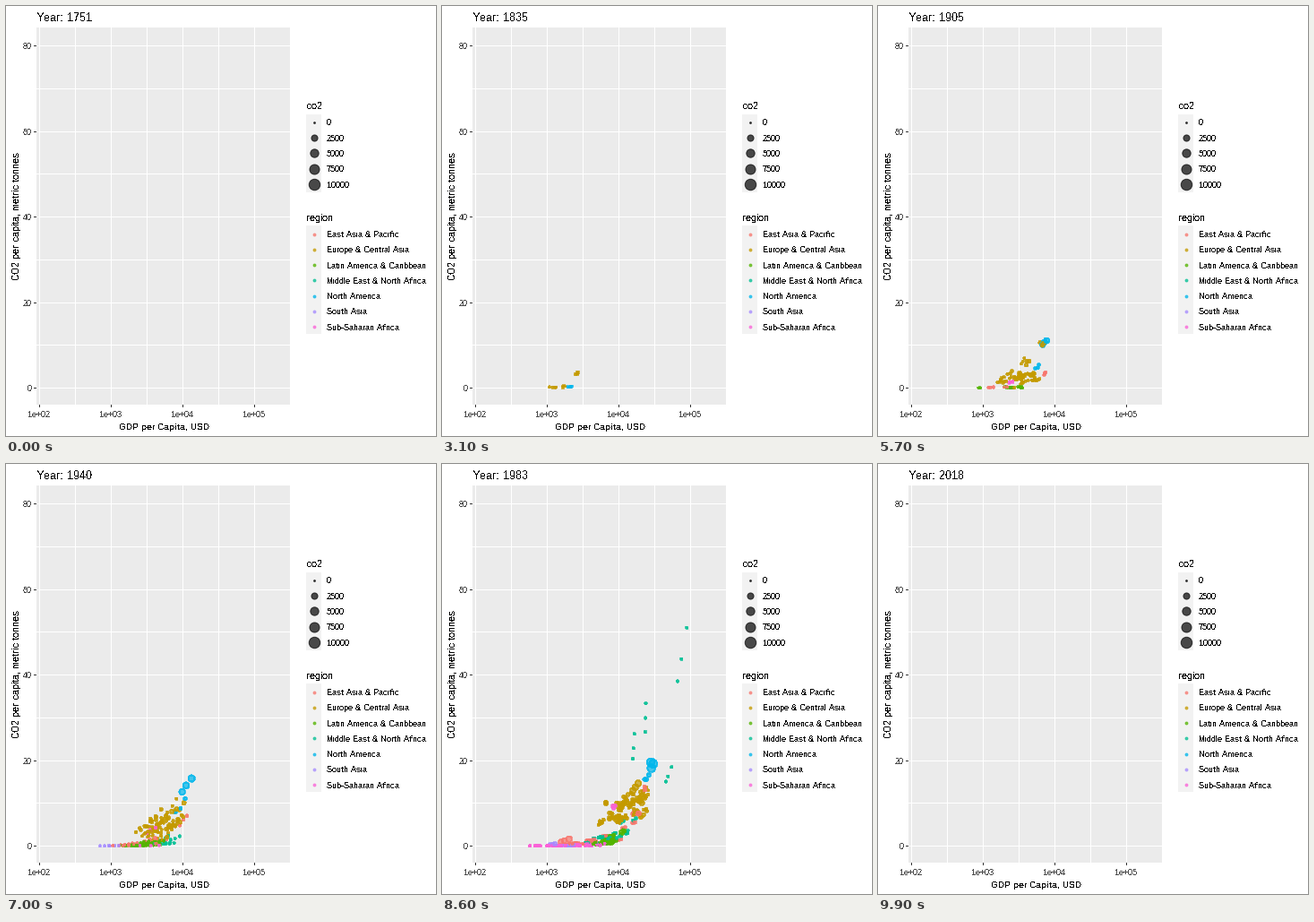
A matplotlib script that plays this animation: 480x480 px, repeating every 10 s.

```python
import numpy as np
import matplotlib.pyplot as plt
from matplotlib.animation import FuncAnimation
from matplotlib.colors import to_rgba
from matplotlib.patches import Rectangle

plt.rcParams.update({
    "font.family": "Liberation Sans",
    "text.hinting": "native",
    "text.hinting_factor": 1,
    "text.antialiased": False,
})

SIZE, FRAMES, STEP_MS = 480, 100, 100
FIRST, LAST = 1751, 2018
TRAIL = 3
ALPHA = .7

REGIONS = {
    "East Asia & Pacific": "#F8766D",
    "Europe & Central Asia": "#C49A00",
    "Latin America & Caribbean": "#53B400",
    "Middle East & North Africa": "#00C094",
    "North America": "#00B6EB",
    "South Asia": "#A58AFF",
    "Sub-Saharan Africa": "#FB61D7",
}
EAP, ECA, LAC, MENA, NAM, SAS, SSA = REGIONS.values()
rng = np.random.default_rng(12)


def bump(t, center, width):
    return np.exp(-((t - center) / width) ** 2)


def industrial(color, start, pop, gdp, growth, peak, mid, width):
    """Exponential GDP growth with CO2 per head on a logistic curve."""
    phase = rng.uniform(0, 2 * np.pi)

    def at(t):
        slump = bump(t, 1933, 6)
        g = gdp + growth * (t - 1983) - .12 * slump + .008 * np.sin(.7 * t + phase)
        co2 = peak / (1 + np.exp((mid - t) / width)) * (1 - .3 * slump)
        co2 *= 1 + .04 * np.sin(.9 * t + phase)
        if mid < 1965:
            co2 *= 1 - .007 * max(0, t - 1985)
        return g, co2
    return color, start, pop, at


def oil_state(start, pop, gdp, gdp_lift, co2, co2_lift, boom):
    """A boom that fades back to a high plateau."""
    def at(t):
        b = bump(t, boom, 12)
        return gdp + gdp_lift * b + .006 * max(0, t - 1983), co2 + co2_lift * b
    return MENA, start, pop, at


def crowd(color, n, starts, gdp, growth, rate, power, mids):
    """Smaller economies; ranges run from the earliest to the latest starter."""
    for u in np.linspace(0, 1, n):
        g = np.interp(u, (0, 1), gdp) + rng.uniform(-.2, .2)
        yield industrial(
            color, np.interp(u, (0, 1), starts), 10 ** rng.uniform(0, 1.5),
            g, growth * rng.uniform(.7, 1.3),
            rng.uniform(*rate) * 10 ** (power * (g - 4)),
            np.interp(u, (0, 1), mids) + rng.uniform(-12, 12), 18)


def build_economies():
    small = [
        *crowd(ECA, 34, (1834, 1964), (4.35, 3.9), .0085, (6, 12), .2, (1915, 1955)),
        *crowd(EAP, 15, (1900, 1975), (4.1, 3.2), .008, (1.5, 5), 1, (1950, 1975)),
        *crowd(LAC, 25, (1892, 1960), (3.9, 3.7), .007, (1, 4), 1, (1945, 1970)),
        *crowd(MENA, 14, (1925, 1960), (4.1, 3.7), .006, (2.5, 6), 1, (1960, 1970)),
        *crowd(SAS, 5, (1925, 1960), (3.2, 3.1), .006, (.6, 1.5), 1, (1960, 1980)),
        *crowd(SSA, 38, (1938, 1964), (3.7, 2.9), .003, (.4, 1.8), 1, (1955, 1975)),
    ]
    order = rng.permutation(len(small))
    oil = [
        oil_state(1950, .35, 4.75, .5, 32, 48, 1966),
        oil_state(1958, 1.2, 4.63, .7, 14, 30, 1961),
        oil_state(1950, .4, 4.18, .08, 17, 20, 1967),
        oil_state(1945, .4, 4.36, .02, 20, 18, 1971),
    ]
    large = [
        industrial(SAS, 1945, 733, 3.1, .01, 2.2, 2000, 14),
        industrial(SSA, 1884, 30, 3.95, .007, 11, 1945, 22),
        industrial(LAC, 1901, 129, 3.9, .012, 2.6, 1980, 15),
        industrial(LAC, 1891, 73, 4.08, .0085, 4.2, 1955, 15),
        industrial(ECA, 1820, 56, 4.29, .0058, 11, 1848, 20),
        industrial(ECA, 1834, 78, 4.33, .0088, 10.5, 1897, 17),
        industrial(ECA, 1820, 54, 4.34, .0082, 7.2, 1905, 20),
        industrial(ECA, 1830, 36, 3.83, .004, 12, 1930, 30),
        industrial(ECA, 1860, 140, 4.26, .0105, 16, 1960, 11),
        industrial(EAP, 1858, 15, 4.37, .0063, 19, 1952, 33),
        industrial(EAP, 1870, 119, 4.28, .0145, 9.2, 1957, 14),
        industrial(EAP, 1952, 1030, 3.3, .02, 8, 1997, 10),
        industrial(NAM, 1870, 25, 4.41, .0081, 17, 1922, 22),
        industrial(NAM, 1820, 234, 4.48, .0077, 19, 1898, 16),
    ]
    return [small[i] for i in order] + oil + large


def px(log_gdp):
    return 37.5 + 80 * (log_gdp - 2)


def py(co2):
    return 426.5 - 4.775 * co2


def dot_radius(size):
    return .375 * (size * 2.845 + .945) - .5


def radius(total):
    return dot_radius(1 + 5 * np.sqrt(min(max(total, 0) / 10100, 1)))


fig = plt.figure(figsize=(SIZE / 72, SIZE / 72), dpi=72, facecolor="white")
ax = fig.add_axes([0, 0, 1, 1])
ax.set(xlim=(0, SIZE), ylim=(SIZE, 0))
ax.axis("off")


def box(x, y, w, h, color):
    ax.add_patch(Rectangle((x, y), w, h, fc=color, lw=0,
                           antialiased=False, zorder=1))


def label(x, y, s, size=9, color="black", **kw):
    return ax.text(x, y, s, fontsize=size, color=color, va="baseline", **kw)


def dot(x, y, r, color):
    ax.scatter([x], [y], s=[4 * r * r], color=[to_rgba(color, ALPHA)],
               linewidths=1, antialiaseds=False, zorder=3)


def draw_panel():
    box(34, 24, 283, 421, "#EBEBEB")
    for i in range(7):
        box(37 + 40 * i, 24, 1, 421, "white")
    for v in range(0, 81, 10):
        box(34, int(py(v)), 283, 1, "white")
    for i in range(4):
        x = 37 + 80 * i
        box(x, 445, 1, 3, "#333333")
        label(x, 459, f"1e+0{i + 2}", color="#4D4D4D", ha="center")
    for v in range(0, 81, 20):
        y = int(py(v))
        box(31, y, 3, 1, "#333333")
        label(29, y + 4, str(v), color="#4D4D4D", ha="right")
    label(176, 473, "GDP per Capita, USD", 10, ha="center")
    label(15, 235, "CO2 per capita, metric tonnes", 11, ha="center",
          rotation=90, rotation_mode="anchor")


def draw_legend():
    label(335, 115, "co2", 11)
    box(335, 121, 17, 87, "#F2F2F2")
    for i in range(5):
        y = 129.4 + 17.28 * i
        dot(343.5, int(y) + .5, radius(2500 * i), "black")
        label(358, round(y + 4), str(2500 * i))
    label(335, 240, "region", 11)
    box(335, 245, 17, 121, "#F2F2F2")
    for i, (name, color) in enumerate(REGIONS.items()):
        y = 254 + 17.28 * i
        dot(343.5, int(y) + .5, dot_radius(1.5), color)
        label(358, round(y + 4), name)


draw_panel()
draw_legend()
title = label(34, 17, "", 13)
points = ax.scatter([], [], linewidths=1, antialiaseds=False, zorder=4)
economies = build_economies()


def year_at(i):
    return FIRST + (LAST - FIRST) * i / (FRAMES - 1)


def draw(i):
    title.set_text(f"Year: {round(year_at(i))}")
    xy, sizes, colors = [], [], []
    visible = i < FRAMES - 1
    for lag in reversed(range(TRAIL if visible else 0)):
        t = year_at(i - lag)
        for color, start, pop, at in economies:
            if t < start:
                continue
            gdp, co2 = at(t)
            r = radius(pop * np.exp(.009 * (t - 1983)) * co2)
            xy.append((px(gdp), py(co2)))
            sizes.append(4 * r * r)
            colors.append(to_rgba(color, ALPHA))
    points.set_offsets(np.array(xy).reshape(-1, 2))
    points.set_sizes(np.array(sizes))
    points.set_color(np.array(colors).reshape(-1, 4))
    return title, points


anim = FuncAnimation(fig, draw, frames=FRAMES, interval=STEP_MS,
                     repeat=True, repeat_delay=0)
plt.show()
```
